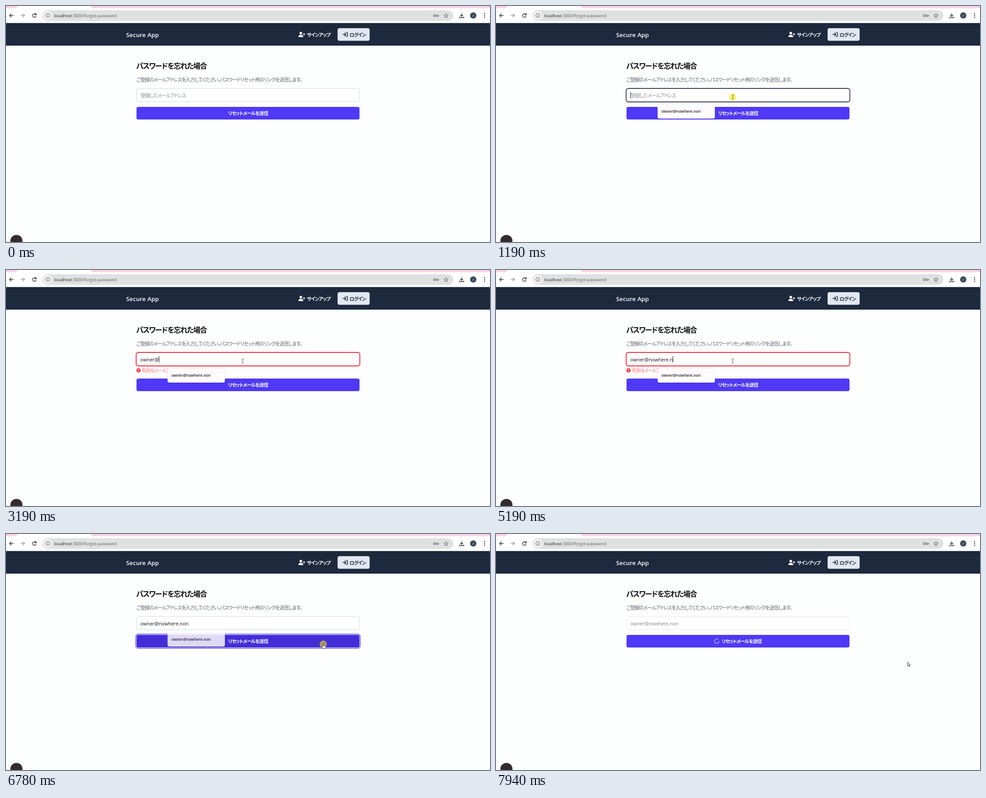
An HTML page that plays this animation: 1068 by 524 pixels, repeating every 8 s.

```html
<!DOCTYPE html>
<html lang="ja">
<head>
<meta charset="utf-8">
<title>Secure App</title>
<style>
html, body { margin: 0; width: 100%; height: 100%; overflow: hidden; background: #fdfefe; }
svg { display: block; }
text { font-family: "Open Sans", "Noto Sans", sans-serif; white-space: pre; }
.jp { font: 10.8px "Noto Sans CJK JP", "Noto Sans CJK", sans-serif; font-feature-settings: "palt"; letter-spacing: -.08em; }
.bold { font-size: 10.6px; font-weight: 700; letter-spacing: -.1em; }
.title { font-size: 16px; letter-spacing: -.085em; }
.line { fill: none; stroke: #333; stroke-width: 1.4; }
.thin { stroke: #55585c; stroke-width: 1; }
</style>
</head>
<body>
<svg width="1068" height="524">
  <!-- browser bar -->
  <rect width="1068" height="38" fill="#fff"/>
  <path d="M0 0H25Q24 5 18 5H0ZM187 0H1068V5H194Q188 5 187 0Z" fill="#f8d4e5"/>
  <rect y="37" width="1068" height="1" fill="#d3d8de"/>
  <g class="line">
    <path d="M16.500 21H8M12 17L8 21L12 25"/>
    <path d="M32.500 21H41M37 17L41 21L37 25" stroke="#999" style="stroke:#999"/>
    <path d="M65.500 18.500A4 4 0 1 0 66.500 22M66.700 16V19.500H63"/>
  </g>
  <rect x="81" y="9.500" width="906" height="23.500" rx="11.700" fill="#dfe0e0"/>
  <circle cx="92.500" cy="21" r="9" fill="#fff"/>
  <g class="line" style="stroke-width:1.100">
    <circle cx="92.500" cy="21" r="4.500"/>
    <path d="M92.500 18.300V19.500M92.500 20.300V23.700"/>
  </g>
  <text x="106.500" y="25" font-size="9.500" letter-spacing="-.12" fill="#5c5f62"><tspan fill="#222">localhost</tspan>:3000/forgot-password</text>
  <g class="line thin" stroke-linejoin="round">
    <circle cx="945.500" cy="21.500" r="2.700"/>
    <path d="M948.200 20.400H954.500V22.600H948.200M952 22.600V24.300"/>
    <circle cx="945.500" cy="21.500" r=".5"/>
    <path d="M971 16.800L972.300 19.900L975.600 20.200L973.100 22.400L973.900 25.700L971 23.900L968.100 25.700L968.900 22.400L966.400 20.200L969.700 19.900Z"/>
  </g>
  <path class="line" d="M1005.500 16V23M1002.300 20L1005.500 23.200L1008.700 20M1001 23.500V26H1010V23.500"/>
  <circle cx="1031" cy="21" r="7" fill="#3d5060"/>
  <text x="1031" y="23.500" font-size="7.500" text-anchor="middle" fill="#dde3e8">r</text>
  <g fill="#333"><circle cx="1056" cy="17" r="1.200"/><circle cx="1056" cy="21" r="1.200"/><circle cx="1056" cy="25" r="1.200"/></g>

  <!-- site header -->
  <rect y="38" width="1068" height="50" fill="#1d293d"/>
  <text x="265" y="69" font-size="13.400" font-weight="600" fill="#fff">Secure App</text>
  <g fill="#fff">
    <circle cx="650.500" cy="60.200" r="2.900"/>
    <path d="M645.200 69Q645.200 64.300 649.300 64.300H651.700Q655.800 64.300 655.800 69Z"/>
    <path d="M657.500 60V65.500M654.800 62.700H660.200" stroke="#fff" stroke-width="1.300"/>
    <text class="jp bold" x="664" y="67.500">サインアップ</text>
  </g>
  <rect x="731.700" y="49.300" width="70.700" height="27.900" rx="4" fill="#e2e8f0"/>
  <path class="line" style="stroke:#1d293d;stroke-width:1.600" stroke-linecap="round" stroke-linejoin="round" d="M743 63.200H749.500M747 60L750.200 63.200L747 66.400M750.500 58.800H752Q753.500 58.800 753.500 60.300V66Q753.500 67.600 752 67.600H750.500"/>
  <text class="jp bold" x="758" y="67.500" fill="#1d293d">ログイン</text>

  <!-- form -->
  <text class="jp bold title" x="287.500" y="139.300" fill="#111">パスワードを忘れた場合</text>
  <text class="jp" x="287.500" y="168.300" fill="#5a6370">ご登録のメールアドレスを入力してください。パスワードリセット用のリンクを送信します。</text>
  <g id="field">
    <rect x="288" y="183.500" width="492" height="29" rx="4" fill="#fff" stroke="#d3d9df"/>
    <rect id="focus" x="287.200" y="183" width="493.600" height="30" rx="4.500" fill="none" stroke-width="1.800"/>
    <text id="hint" class="jp" x="297" y="202.500" fill="#858b93">登録したメールアドレス</text>
    <text id="typed" x="296.500" y="202.500" font-size="10.600" fill="#111"></text>
    <rect id="caret" y="191" width="1" height="14.500" fill="#111"/>
  </g>
  <g id="error">
    <circle cx="292.500" cy="222.800" r="4.800" fill="#fb4049"/>
    <path d="M292.500 220V223.300M292.500 224.400V225.700" stroke="#fff" stroke-width="1.200"/>
    <text class="jp" x="300" y="226.700" style="font-size:10px" fill="#fb6a72">有効なメールアドレスではありません</text>
  </g>
  <g id="button">
    <rect id="ring" x="286.200" y="222.200" width="495.600" height="31.600" rx="5.500" fill="#fff" stroke="#5b48ea" stroke-width="1.400"/>
    <rect id="face" x="288" y="224" width="492" height="28" rx="4"/>
    <g id="spinner" fill="#fff"></g>
    <text id="label" class="jp bold" y="242" text-anchor="middle" fill="#fff">リセットメールを送信</text>
  </g>
  <g id="popup">
    <path d="M360.500 219H368.500L372 215L375.500 219H479Q483 219 483 223V246Q483 250 479 250H360.500Q356.500 250 356.500 246V223Q356.500 219 360.500 219Z" fill="#fefbff" style="filter:drop-shadow(0 1px 1.500px #0002)"/>
    <text x="365" y="237.200" font-size="8.400" font-weight="600" fill="#26232b">owner@nowhere.non</text>
  </g>

  <circle cx="23" cy="521.500" r="13.300" fill="#332c2d"/>

  <g id="cursor">
    <circle id="halo" r="8" fill="#ffec00" opacity=".56"/>
    <path id="beam" class="line thin" d="M-2.500 -4.500Q0 -4.500 0 -3.500Q0 -4.500 2.500 -4.500M0 -4V4M-2.500 4.500Q0 4.500 0 3.500Q0 4.500 2.500 4.500"/>
    <path id="arrow" d="M0 0V9L2.100 7.200L3.600 10.400L5 9.800L3.600 6.700H6.300Z" fill="#fff" stroke="#222" stroke-width=".9"/>
    <path id="hand" d="M-.5 0Q.8 -1 1.200 .5V3.500L5 4.300Q6 4.700 5.800 6L5 10H.3L-2.500 6Q-2.300 4.700 -.8 5.800Z" fill="#fff" stroke="#222" stroke-width=".8"/>
  </g>
</svg>
<script>
const $ = id => document.getElementById(id);
const show = (id, on) => $(id).style.display = on ? '' : 'none';
const clamp = v => Math.max(0, Math.min(1, v));

const email = 'owner@nowhere.non';
const keyTimes = [1640, 1760, 1970, 2120, 2240, 3190, 3450, 3660, 3980, 4200,
  4460, 4730, 4790, 4980, 5190, 5290, 5390];
const focusAt = 1120, validAt = 5290, pressAt = 6780, sendAt = 6900;
// time, x, y
const path = [[450, 813, 373], [1050, 522.5, 202], [5930, 522.5, 202], [6430, 700, 244.5],
  [6920, 700, 244.5], [7190, 828, 271], [7540, 902, 283], [7640, 908, 284]];

// Seven dots on a ring, with one gap
for (let i = 0; i < 7; i++) {
  const a = i * Math.PI / 4;
  $('spinner').innerHTML += `<circle cx="${4.9 * Math.cos(a)}" cy="${4.9 * Math.sin(a)}" r="1.1"/>`;
}

function cursorAt(t) {
  const i = path.findIndex(p => p[0] > t);
  if (i < 0) return path[path.length - 1].slice(1);
  if (i === 0) return path[0].slice(1);
  const [t0, x0, y0] = path[i - 1], [t1, x1, y1] = path[i];
  let k = (t - t0) / (t1 - t0);
  if (t < pressAt) k = k * k * (3 - 2 * k);
  return [x0 + (x1 - x0) * k, y0 + (y1 - y0) * k];
}

function draw(t) {
  const count = keyTimes.filter(k => t >= k).length;
  const error = count > 0 && t < validAt;
  const focused = t >= focusAt && t < pressAt;
  const sending = t >= sendAt;

  $('field').setAttribute('opacity', sending ? .52 : 1);
  show('focus', focused);
  $('focus').setAttribute('stroke', error ? '#f5283a' : '#364153');
  show('hint', !count);
  $('typed').textContent = email.slice(0, count);
  const lastInput = count ? keyTimes[count - 1] : focusAt;
  show('caret', focused && Math.floor((t - lastInput) / 530) % 2 === 0);
  $('caret').setAttribute('x', 296.5 + (count ? $('typed').getComputedTextLength() : 0));

  const [x, y] = cursorAt(t);
  const inside = (top, bottom) => x > 288 && x < 780 && y > top && y < bottom;
  const overField = inside(183, 213), overButton = inside(224, 252) && t >= 450;
  show('error', error);
  $('button').setAttribute('transform', `translate(0 ${error ? 17 : 0})`);
  show('ring', t >= pressAt && !sending);
  $('face').setAttribute('fill', overButton && !sending ? '#432dd7' : '#4f39f6');
  $('label').setAttribute('x', sending ? 542 : 534);
  show('spinner', sending);
  $('spinner').setAttribute('transform', `translate(487 238) rotate(${(t - sendAt) * .36})`);

  $('popup').setAttribute('opacity', t < pressAt ? clamp((t - focusAt) / 60) : clamp(.84 - (t - pressAt) / 150));

  show('cursor', t >= 450);
  $('cursor').setAttribute('transform', `translate(${x} ${y})`);
  show('halo', t >= 1060 && t < 1250 || t >= pressAt && t < sendAt);
  show('beam', overField);
  show('hand', overButton);
  show('arrow', !overField && !overButton);
}

const start = performance.now();
function tick() {
  draw((performance.now() - start) % 8000);
  requestAnimationFrame(tick);
}
tick();
</script>
</body>
</html>
```
